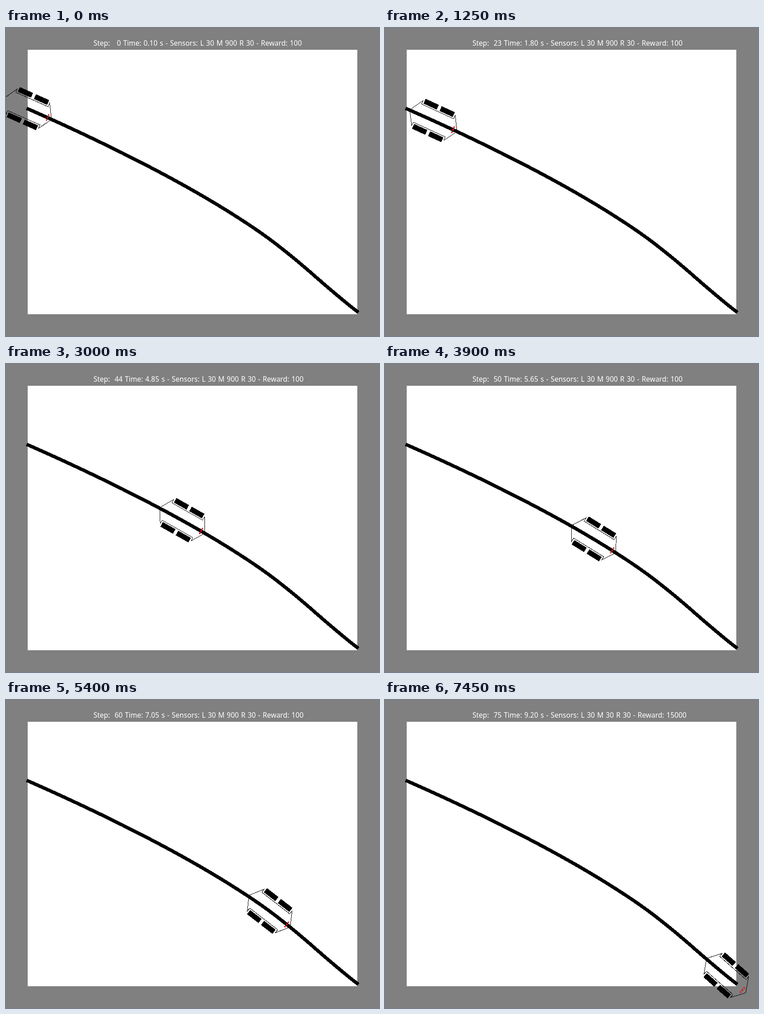
An HTML page for the animation above (7.6 s loop, 825 by 679 pixels).

```html
<!DOCTYPE html>
<html lang="en">
<head>
<meta charset="utf-8">
<title>Line follower</title>
<style>
  html, body { margin: 0; width: 100%; height: 100%; overflow: hidden; background: #808080; }
  svg { display: block; }
  text { font: 15.5px "Noto Sans", "Open Sans", sans-serif; word-spacing: 1.05px; white-space: pre; fill: #fff; }
</style>
</head>
<body>
<svg width="825" height="679" viewBox="0 0 825 679" shape-rendering="crispEdges">
  <defs><path id="wheels" d="M-35.5-5.75h32v11.5h-32zM3.5-5.75h32v11.5h-32z"/></defs>
  <rect x="48" y="48" width="729" height="583" fill="#fff"/>
  <path id="track" fill="none" stroke="#000" stroke-width="7.6"
    d="M45.5 177C137 217 228.5 260 320 307.5C400 349 480 394 560 449C603 479 647 515 690 553C720 579 750 605 779.5 627"/>
  <g id="car">
    <path fill="none" stroke="#000" d="M57.5 0L39 30V21.5H-39V30L-57.5 0L-39-31V-22.5H39V-31Z"/>
    <use href="#wheels" y="-31"/>
    <use href="#wheels" y="30"/>
    <path fill="#f00" d="M46.3-7.5h3v3h-3zM46-1.8h3.6v3.6h-3.6zM46.3 4.5h3v3h-3z"/>
  </g>
  <text id="status" x="193.5" y="39"></text>
</svg>
<script>
const [track, car, status_] = ['track', 'car', 'status'].map(id => document.getElementById(id));
const LOOP = 7600, LAST = 75, IDLE = 19;
const SPEED = 103.6, DEPART = 1.18, LOOKAHEAD = 24;
const steepest = track.getTotalLength() * 0.86;

// Steps on which the left sensor touches the line and the course is corrected
const corrections = [27, 37, 47, 49, 54, 57, 62, 65];

// Simulated seconds: the robot idles first, then corrections are shorter than other steps
function simTime(step) {
  if (step <= IDLE) return 0.1 + Math.round(step * 22 / IDLE) * 0.05;
  return 1.2 + (step - IDLE) * 0.15 - corrections.filter(c => c <= step).length * 0.05;
}

// Follows the track at constant speed and keeps its heading past the steepest part
function poseAt(time) {
  const along = 3 + SPEED * Math.max(0, time - DEPART);
  const ahead = Math.min(along + LOOKAHEAD, steepest);
  const { x, y } = track.getPointAtLength(along);
  const a = track.getPointAtLength(ahead - 3), b = track.getPointAtLength(ahead + 3);
  return [x, y, Math.atan2(b.y - a.y, b.x - a.x) * 180 / Math.PI];
}

// Milliseconds a step stays on screen
function hold(step) {
  if (step < 20) return step % 10 ? 50 : 100;
  const brief = step < 41 ? step % 5 < 4 : step > 60 && corrections.includes(step);
  return brief ? 50 : 150;
}

function stepAt(ms) {
  let step = 0;
  while (step < LAST && ms >= hold(step)) ms -= hold(step++);
  return step;
}

function draw(step) {
  const time = simTime(step), [x, y, angle] = poseAt(time), done = step === LAST;
  const left = corrections.includes(step) ? 456 : 30;
  car.setAttribute('transform', `translate(${x} ${y}) rotate(${angle})`);
  status_.textContent = `Step: ${String(step).padStart(3)} Time: ${time.toFixed(2)} s - ` +
    `Sensors: L ${left} M ${done ? 30 : 900} R 30 - Reward: ${done ? 15000 : 100}`;
}

const start = performance.now();
let shown = -1;
function tick() {
  const step = stepAt((performance.now() - start) % LOOP);
  if (step !== shown) draw(shown = step);
  requestAnimationFrame(tick);
}
tick();
</script>
</body>
</html>
```
